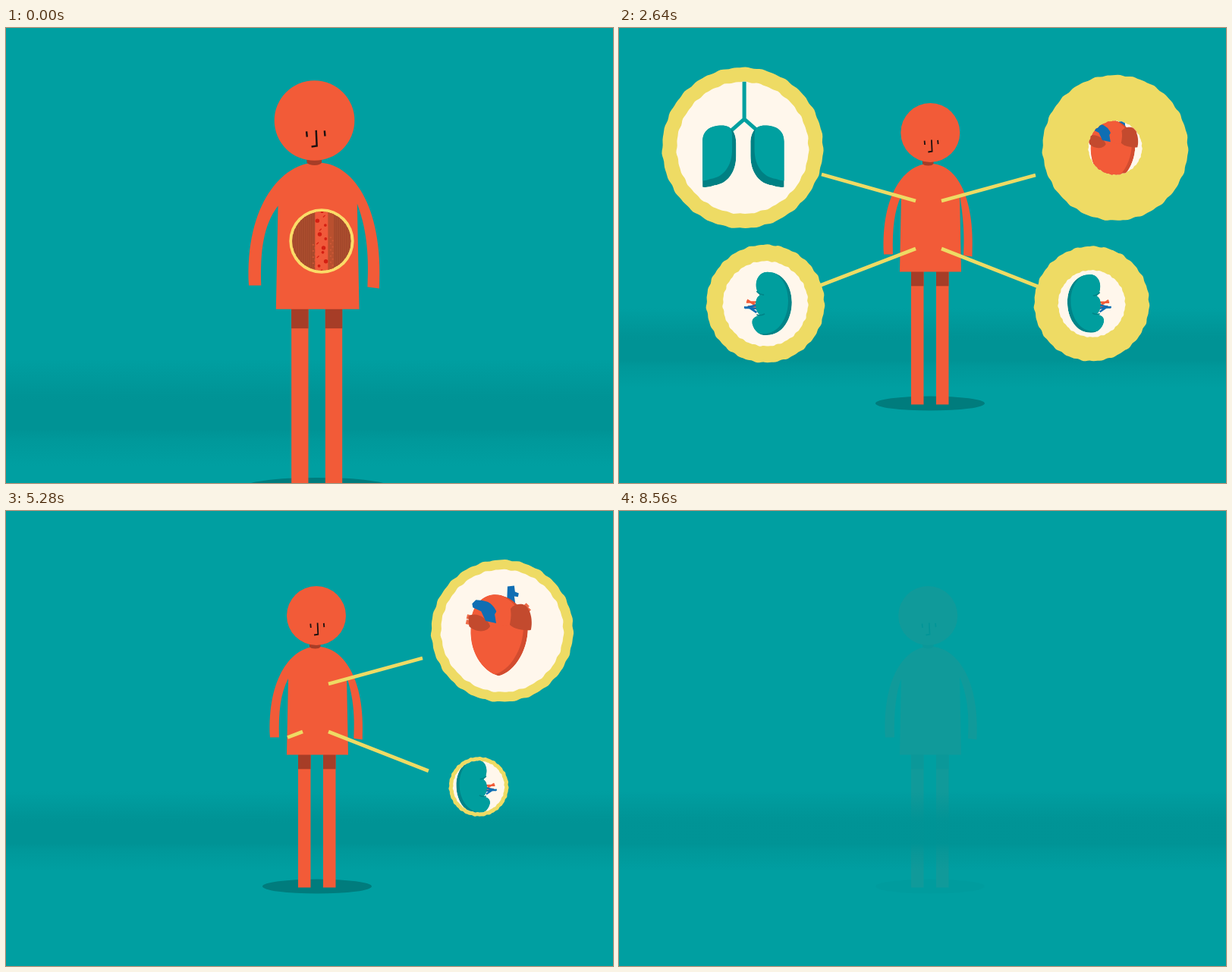
An HTML page with a canvas for the animation above (8.84 s loop, 800 by 600 pixels).

```html
<!DOCTYPE html>
<html lang="en">
<head>
<meta charset="utf-8">
<title>Organs</title>
<style>
html, body { margin: 0; width: 100%; height: 100%; overflow: hidden; background: #009fa1; }
canvas { display: block; }
</style>
</head>
<body>
<canvas id="stage" width="800" height="600"></canvas>
<script>
const c = document.getElementById('stage').getContext('2d');
const LOOP = 8840, FRAME = 40, LAST = 8560;
const TEAL = '#009fa1', ORANGE = '#f25b38', BROWN = '#a63d27', YELLOW = '#eedb64',
  CREAM = '#fff7ec', BLUE = '#0f6eb3', RUST = '#c34a2e';

const mix = (a, b, k) => a + (b - a) * k;
const span = (t, start, length) => Math.min(1, Math.max(0, (t - start) / length));
const easeOut = x => 1 - (1 - x) ** 3;
const easeInOut = x => x < .5 ? 4 * x ** 3 : 1 - 4 * (1 - x) ** 3;
const smooth = x => x * x * (3 - 2 * x);

// Smooth interpolation through [time, value] keys
function track(t, keys) {
  const i = keys.findIndex(k => k[0] > t);
  if (i < 1) return keys[i ? keys.length - 1 : 0][1];
  const [t0, a] = keys[i - 1], [t1, b] = keys[i];
  return mix(a, b, smooth((t - t0) / (t1 - t0)));
}

function fill(path, color) {
  c.fillStyle = color;
  c.fill(typeof path === 'string' ? new Path2D(path) : path);
}

function stroke(path, color, width) {
  c.strokeStyle = color;
  c.lineWidth = width;
  c.stroke(new Path2D(path));
}

function disc(x, y, r, color) {
  const p = new Path2D();
  p.arc(x, y, r, 0, 7);
  fill(p, color);
}

function box(x, y, w, h, color) {
  c.fillStyle = color;
  c.fillRect(x, y, w, h);
}

// A shape whose shade shows where its shifted lit copy leaves it uncovered
function shaded(d, color, shade, dx, dy) {
  const p = new Path2D(d);
  c.save();
  c.clip(p);
  fill(p, shade);
  c.translate(dx, dy);
  fill(p, color);
  c.restore();
}

// Slightly uneven, hand-cut circle
function roughCircle(r) {
  const p = new Path2D(), rough = Math.min(1, r / 60);
  for (let i = 0; i < 180; i++) {
    const a = i * Math.PI / 90;
    const q = r + rough * (.45 * Math.sin(23 * a) + .4 * Math.sin(37 * a + 1));
    p.lineTo(q * Math.cos(a), q * Math.sin(a));
  }
  p.closePath();
  return p;
}

function lungs() {
  stroke('M2-83V-36L-15-21M2-36L19-21', '#00a0a0', 4.8);
  for (const side of [1, -1]) {
    c.save();
    c.translate(.8, 0);
    c.scale(side, 1);
    shaded('M-51 49V-8C-51-22-41-28-27-28C-14-28-9-18-9-6V10C-9 31-20 45-36 47Q-43 50-51 49Z',
      '#00a0a0', '#008083', -5, -8);
    c.restore();
  }
}

function kidney() {
  stroke('M10-2L26-2M12 3L25-5M12 4L24 4', ORANGE, 2.6);
  stroke('M10 7L29 5M12 12L24 4M12 2L28 6', BLUE, 2.8);
  shaded('M-5-43C8-45 15-32 12-20C11-14 8-14 8-11C15-8 15 10 8 15C12 18 19 18 18 27C15 39 6 44-2 43C-24 43-36 20-36-2C-36-26-22-43-5-43Z',
    '#009e9e', '#008488', 5, -2);
  stroke('M12-17Q8-12 2-12M12 15Q7 17 1 14', '#008488', 1.8);
}

function mirroredKidney() {
  c.scale(-1, 1);
  kidney();
}

function heart() {
  c.translate(-654, -158);
  fill('M660 126L661 99L670 98L671 106L676 108L675 113L670 112L672 126Z', BLUE);
  stroke('M680 131L688 123M682 137L690 128M616 141L607 139M616 148L606 146', '#ee6a48', 6);
  shaded('M613 148C608 185 628 212 649 218C672 213 690 180 688 150C684 128 664 108 641 110C624 112 612 130 613 148Z',
    ORANGE, '#d24c2f', -6, -2);
  fill('M664 150C657 132 668 120 682 123C692 127 695 145 692 157C683 158 670 156 664 150Z', RUST);
  fill('M609 139C618 132 634 140 638 152C633 161 618 160 610 152Z', RUST);
  fill('M614 122L619 117Q637 117 649 128L644 136L646 148L632 145L626 132L615 127Z', BLUE);
  fill('M640 111C660 108 670 125 664 150Q655 153 648 148Q650 128 634 119Z', ORANGE);
}

// start: bubble opens, settle: overshoot relaxes, end: bubble closes
const big = { peak: [106, 87], rest: [95.5, 82.5] };
const small = { peak: [78, 66], rest: [70.5, 61] };
const organs = [
  { ...big, draw: lungs, x: 163, y: 158, line: [391, 228, 267, 193], start: 1420, settle: 2800, end: 4540, swell: 1 },
  { ...small, draw: mirroredKidney, x: 193, y: 363.5, line: [391, 291, 256, 343], start: 1840, settle: 3060, end: 4780, swell: 1 },
  { ...small, draw: kidney, x: 623, y: 363.5, line: [425, 291, 560, 344], start: 1990, settle: 3280, end: 5000, swell: 1 },
  { ...big, draw: heart, x: 654, y: 158, line: [425, 228, 549, 194], start: 2130, settle: 3300, end: 5220, swell: 0 }
];

function pointer(o, t) {
  const k = span(t, o.start - 300, 390) * (1 - smooth(span(t, o.end + 250, 330)));
  if (!k) return;
  const [x, y, x1, y1] = o.line;
  stroke(`M${x} ${y}L${mix(x, x1, k)} ${mix(y, y1, k)}`, YELLOW, 4.6);
}

function bubble(o, t) {
  const settled = smooth(span(t, o.settle, 440));
  const shrink = 1 - span(t, o.end, 420) ** 2;
  const dot = 4.5 * easeOut(span(t, o.start - 200, 150));
  const [r, inner] = [0, 1].map(i => mix(o.peak[i], o.rest[i], settled)
    * easeOut(span(t, o.start + 360 * i, 940)) * shrink);
  const outer = Math.max(dot * shrink, r);
  if (!outer) return;
  c.save();
  c.translate(o.x, o.y);
  fill(roughCircle(outer), YELLOW);
  if (inner > 0) {
    const hole = roughCircle(inner), w = inner / o.rest[1];
    fill(hole, CREAM);
    c.clip(hole);
    const s = w > 1 ? 1 + (w - 1) * o.swell : 1 - .4 * (1 - w);
    c.scale(s, s);
    o.draw();
  }
  c.restore();
}

function backdrop() {
  box(-400, -400, 1600, 1600, TEAL);
  const g = c.createLinearGradient(0, 370, 0, 474);
  for (const [at, a] of [[0, 0], [.33, .9], [.4, 1], [.66, 1], [.74, .6], [1, 0]])
    g.addColorStop(at, `rgba(0,147,149,${a})`);
  box(-400, 370, 1600, 104, g);
}

// Round view into a blood vessel
function vesselWindow(t) {
  const s = 1 - smooth(span(t, 250, 400));
  if (!s) return;
  c.save();
  c.translate(414.4, 255.3);
  c.scale(s, s);
  disc(0, 0, 31.5, '#fbdc68');
  const hole = new Path2D();
  hole.arc(0, 0, 28.7, 0, 7);
  c.clip(hole);
  fill(hole, '#a3482b');
  for (let x = -29; x < 29; x += 2) box(x, -30, .8, 60, '#ad4f30');
  box(6, -30, 6, 60, '#b9502f');
  for (let i = 0; i < 10; i++) {
    box(-9 + i % 2 * 2, 3 + i * 3, 1.6, 1.2, '#cf5936');
    box(8 + i % 2 * 2, -4 + i * 3, 1.6, 1.2, '#d05a36');
  }
  box(-6.4, -30, 12.6, 60, '#f0593a');
  for (let i = 0; i < 15; i++) {
    const x = 4.2 * Math.sin(i * 2.4 + 4);
    const y = (i * 4.4 + t * .035) % 66 - 33;
    if (i % 3 < 2) disc(x, y, i % 3 ? 1.4 : 2, '#d51f12');
    else stroke(`M${x - 1} ${y + 1}l2-2`, '#d51f12', .9);
  }
  c.restore();
}

function person(t) {
  const head = 408.7 + 1.8 * Math.cos((t - 3300) / LOOP * 2 * Math.PI);
  const l = track(t, [[0, 343.6], [1400, 345], [2640, 349], [3280, 349], [4680, 347], [6280, 350], [8560, 351]]);
  const r = track(t, [[0, 471], [1400, 466], [2640, 466], [3280, 468], [4680, 469], [6280, 473], [8560, 472]]);

  const shadow = new Path2D();
  shadow.ellipse(410, 495, 72, 9.5, 0, 0, 7);
  fill(shadow, '#007c7d');
  for (const x of [385, 418]) {
    box(x, 320, 16.5, 176.5, ORANGE);
    box(x, 320, 16.5, 20.3, BROWN);
  }
  fill(`M410 179C378 178 ${l - 4} 218 ${l} 298.5L${l + 12} 298.5C${l + 11} 265 ${l + 14} 240 372 221
    L370 321.5H451L449 219C${r - 14} 240 ${r - 10} 265 ${r - 12} 300L${r - .5} 301.5C${r + 4} 218 442 178 410 179Z`, ORANGE);
  fill('M400 174H414.5V179Q413 181.5 407.5 181.5Q402 181.5 400 179Z', BROWN);
  disc(head, 138, 39, ORANGE);

  const blink = Math.max(.25, Math.min(1, Math.abs(t - 1400) / 100));
  const eye = 2.7 * blink;
  c.save();
  c.translate(head, 151.3);
  stroke(`M-7.7 ${-eye}L-7.2 ${eye}M9.8 ${-eye - .8}L10.3 ${eye - .8}`, '#1c1110', 1.8);
  stroke('M1.6-3.8L2.3 11.4L-2.9 12.2', '#1c1110', 1.8);
  c.restore();
  vesselWindow(t);
}

function draw(t) {
  c.save();
  const zoom = mix(1.355, 1, easeInOut(span(t, 150, 900)));
  c.translate(410, 183);
  c.scale(zoom, zoom);
  c.translate(-410, -183);
  backdrop();
  person(t);
  c.restore();

  organs.forEach(o => pointer(o, t));
  organs.forEach(o => bubble(o, t));

  // The empty backdrop slowly covers the figure
  if (t > 5800) {
    c.globalAlpha = 1 - Math.exp((5800 - t) / 1020);
    backdrop();
    c.globalAlpha = 1;
  }
}

const began = performance.now();
function tick() {
  const t = (performance.now() - began) % LOOP;
  draw(Math.min(LAST, Math.floor(t / FRAME) * FRAME));
  requestAnimationFrame(tick);
}
tick();
</script>
</body>
</html>
```
